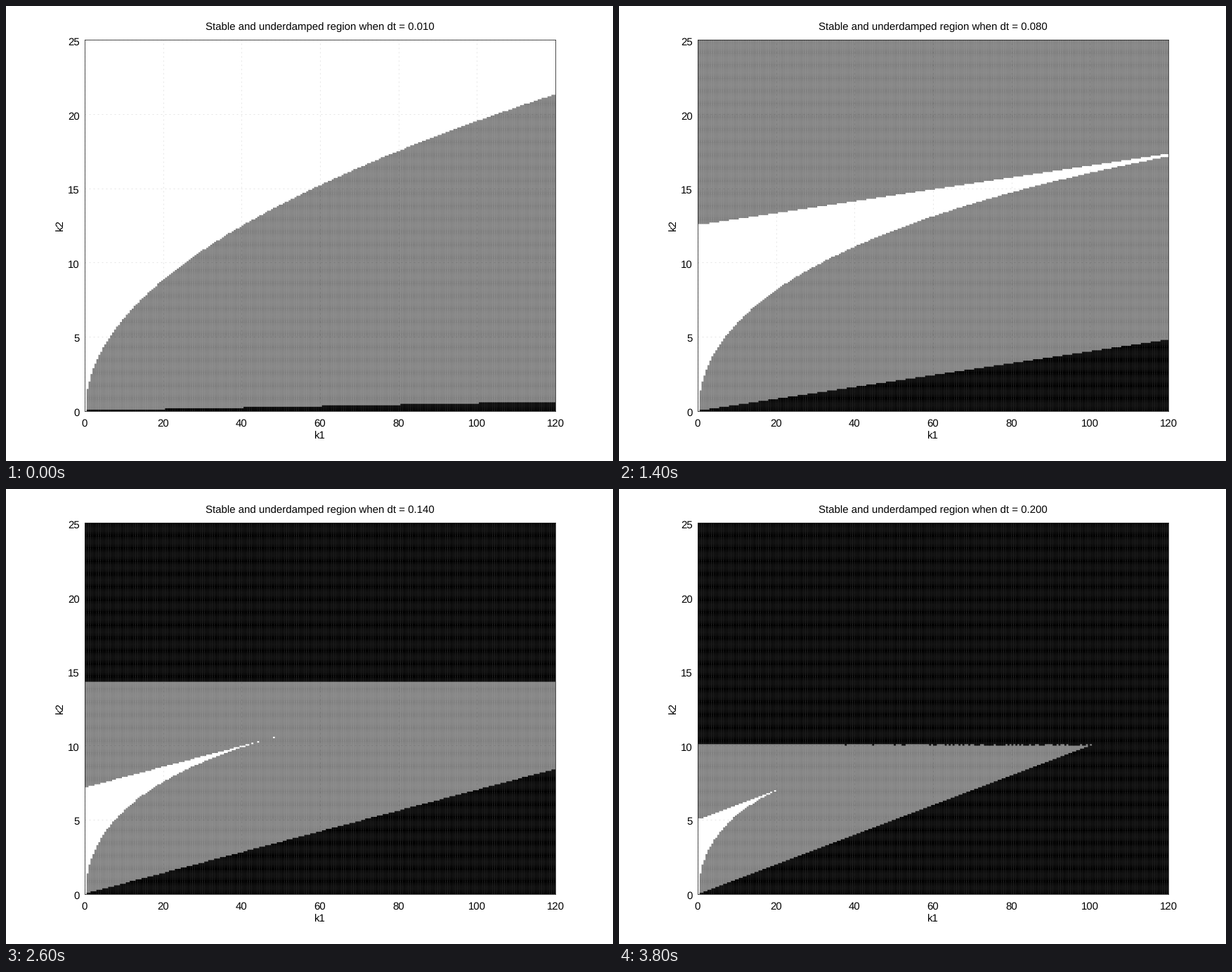
These frames come from a looping animation (864x648 px, 4 s). A matplotlib script:

```python
import numpy as np
import matplotlib.pyplot as plt
from matplotlib.animation import FuncAnimation

W, H = 864, 648
LEFT, RIGHT, TOP, BOTTOM = 112, 782, 48, 577
FRAMES, INTERVAL = 20, 200
K1_MAX, K2_MAX = 120, 25
EPS = 1e-9

plt.rcParams["font.family"] = "Liberation Sans"
plt.rcParams["font.size"] = 15
plt.rcParams["text.hinting"] = "none"

k1_edges = np.arange(241) * 0.5
k2_edges = np.arange(251) * 0.1
K1, K2 = np.meshgrid(k1_edges[:-1], k2_edges[:-1])


def region(step):
    """0 = unstable, 0.5 = stable but oscillating, 1 = stable and monotonic."""
    dt = step / 100
    half_trace = 1 - K1 * dt**2 / 4 - K2 * dt / 2
    det = 1 - K2 * dt + K1 * dt**2 / 2
    stable = (det <= 1 + EPS) & (K2 * dt <= 2 + EPS)

    # Exactly on k2 = 2/dt, rounding tips more cells over as k1 grows
    on_limit = np.abs(K2 * dt - 2) < EPS
    chance = K1 * dt**2 / 4 - 0.3
    noise = np.random.default_rng(step).random(K1.shape)
    stable &= ~(on_limit & (noise < chance))

    # Both eigenvalues real and positive
    smooth = (half_trace**2 - det > EPS) & (det > EPS) & (half_trace > 0)
    smooth |= (K1 == 0) & (K2 * dt <= 1 + EPS)
    return np.where(stable, np.where(smooth, 1.0, 0.5), 0.0)


fig = plt.figure(figsize=(W / 72, H / 72), dpi=72, facecolor="white")
ax = fig.add_axes([LEFT / W, 1 - BOTTOM / H,
                   (RIGHT - LEFT) / W, (BOTTOM - TOP) / H])
ax.set(xlim=(0, K1_MAX), ylim=(0, K2_MAX), xticks=[], yticks=[])
for spine in ax.spines.values():
    spine.set(linewidth=0.8, color="#202020", zorder=6)


def cells(**style):
    return ax.pcolormesh(k1_edges, k2_edges, region(1), cmap="gray", vmin=0,
                         vmax=1, edgecolors="none", linewidth=0, snap=False,
                         **style)


# A translucent base softens the hairline seams of the antialiased cells
meshes = [cells(antialiased=False, alpha=0.25, zorder=1),
          cells(antialiased=True, zorder=2)]

dotted = dict(color="black", alpha=0.13, linewidth=0.8,
              linestyle=(0, (2.5, 5)), dash_capstyle="butt", zorder=4)


def label(x, y, text, **kw):
    return fig.text(x / W, 1 - y / H, text, color="black",
                    va="baseline", rotation_mode="anchor", **kw)


for k in range(0, K1_MAX + 1, 20):
    ax.axvline(k, **dotted)
    label(LEFT + k * (RIGHT - LEFT) / K1_MAX, 599, str(k), ha="center")
for k in range(0, K2_MAX + 1, 5):
    ax.axhline(k, **dotted)
    label(105, 583.7 - k * 21.11, str(k), ha="right")

label(447, 615.5, "k1", ha="center")
label(81, 312.5, "k2", ha="center", rotation=90)
title = label(447, 34, "", ha="center")


def update(i):
    step = i + 1
    grid = region(step)
    for mesh in meshes:
        mesh.set_array(grid)
    title.set_text(f"Stable and underdamped region when dt = {step / 100:.3f}")
    return [*meshes, title]


anim = FuncAnimation(fig, update, frames=FRAMES, interval=INTERVAL,
                     repeat=True, repeat_delay=0, blit=False)
plt.show()
```
